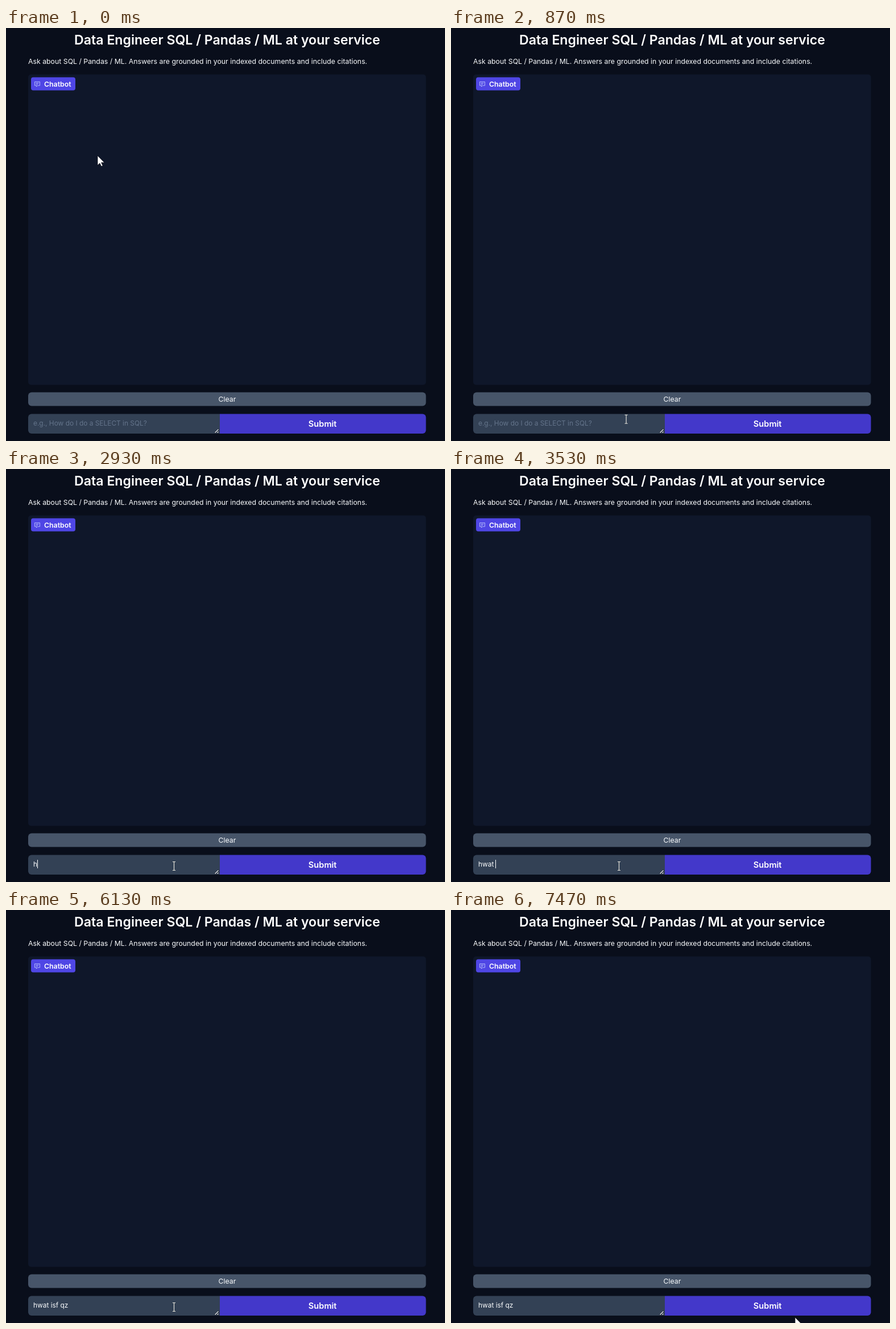
An HTML page that plays this animation: 772 px wide and 725 px high, repeating every 8 s.

```html
<!DOCTYPE html>
<html lang="en">
<head>
<meta charset="utf-8">
<title>Chatbot demo</title>
<style>
  html, body { margin: 0; width: 100%; height: 100%; overflow: hidden; background: #090e1b; }
  svg { display: block; width: 772px; height: 725px; }
  text { font-family: Inter, "Open Sans", sans-serif; font-size: 12.3px; fill: #f8fafc; white-space: pre; }
  .middle { text-anchor: middle; }
  .strong { font-weight: 600; fill: #fff; }
  .title { font-size: 23.1px; }
  .submit { font-size: 14.6px; }
  .field { font-size: 11.9px; }
  .hint { fill: #64748b; }
</style>
</head>
<body>
<svg viewBox="0 0 772 725">
  <rect width="772" height="725" fill="#090e1b"/>
  <text class="middle strong title" x="389" y="28.5">Data Engineer SQL / Pandas / ML at your service</text>
  <text x="39" y="63">Ask about SQL / Pandas / ML. Answers are grounded in your indexed documents and include citations.</text>

  <rect x="39" y="81.5" width="699.5" height="545" rx="5" fill="#0f172a"/>
  <rect x="44" y="86.5" width="78" height="23" rx="4" fill="#4f46e5"/>
  <path d="M50.5 94.5h9v6.5h-4l-2 2v-2h-3zM52.5 96.8h5M52.5 98.8h3.5" fill="none" stroke="#c7d2fe" stroke-width=".8"/>
  <text class="strong" x="67" y="102.5">Chatbot</text>

  <rect x="39" y="639.5" width="699.5" height="24" rx="6" fill="#475569"/>
  <text class="middle" x="389" y="656">Clear</text>

  <path d="M376 677.5H45a6 6 0 0 0-6 6v22.5a6 6 0 0 0 6 6h331z" fill="#334155"/>
  <path d="M376 677.5h356.5a6 6 0 0 1 6 6v22.5a6 6 0 0 1-6 6H376z" fill="#4338ca"/>
  <text class="middle strong submit" x="556.7" y="699.5">Submit</text>
  <g fill="none" transform="translate(-.5 -.5)">
    <path d="M367.5 711.5l7-7M371.5 711.5l3-3" stroke="#0f172a" stroke-width="2.2"/>
    <path d="M368 711l6-6M372 711l2-2" stroke="#fff" stroke-width="1.2"/>
  </g>
  <text id="hint" class="field hint" x="48" y="697.5">e.g., How do I do a SELECT in SQL?</text>
  <text id="typed" class="field" x="48" y="697.5"></text>
  <rect id="caret" y="686" width="1" height="15" fill="#fff"/>

  <path id="arrow" d="M0 0V17L4 13.4L6.6 19L9.2 17.8L6.6 12.2H12Z" fill="#fff" stroke="#0b0f19" stroke-width=".8"/>
  <path id="beam" d="M-2.5-7.5H-.7L0-7L.7-7.5H2.5M0-7V7M-2.5 7.5H-.7L0 7L.7 7.5H2.5" fill="none" stroke="#f1eee4" stroke-width="1.1"/>
</svg>
<script>
const LOOP = 8000, FRAME = 1000 / 15, BLINK = 510, CLICK = 1200;
const [hint, typed, caret, arrow, beam] =
  ["hint", "typed", "caret", "arrow", "beam"].map(id => document.getElementById(id));

const bursts = [
  { text: "hwat ", start: 2930, gap: 150 },
  { text: "is", start: 4270, gap: 0 },
  { text: "f q", start: 4670, gap: 130 },
  { text: "z ", start: 5400, gap: 200 }
];
const keys = bursts.flatMap(({ text, start, gap }) =>
  [...text].map((char, i) => ({ char, time: start + i * gap })));

const home = [161, 224], rest = [295.5, 697], panel = [414, 439], below = [605, 715];
const progress = (time, start, end) => Math.min(1, Math.max(0, (time - start) / (end - start)));
// Quick departure with a long, soft landing.
const swoop = u => u ** 2 / (u ** 2 + (1 - u) ** 6.5);
const bezier = (a, b, c, d, s) => a.map((_, i) =>
  (1 - s) ** 3 * a[i] + 3 * s * (1 - s) ** 2 * b[i] + 3 * s * s * (1 - s) * c[i] + s ** 3 * d[i]);

function pointerAt(time) {
  if (time < 6870) return bezier(home, [90, 140], [600, 460], rest, swoop(progress(time, 270, 1330)));
  if (time < 7190) {
    const s = progress(time, 6870, 7130);
    return rest.map((from, i) => from + (panel[i] - from) * s);
  }
  return time < 7460 ? null : below;
}

function caretVisible(time, pressed) {
  if (time < CLICK) return false;
  const last = pressed.length ? pressed.at(-1).time : CLICK;
  return Math.floor((time - last) / BLINK) % 2 === 0;
}

const show = (node, visible) => node.setAttribute("visibility", visible ? "visible" : "hidden");

function render(now) {
  const time = Math.floor((now + 5) / FRAME) * FRAME;
  const pressed = keys.filter(key => key.time <= time);
  const text = pressed.map(key => key.char).join("");
  if (typed.textContent !== text) typed.textContent = text;
  show(hint, !text);

  const width = text ? typed.getComputedTextLength() : 0;
  caret.setAttribute("x", Math.floor(48 + width));
  show(caret, caretVisible(time, pressed));

  const spot = pointerAt(time);
  const inField = spot && spot[0] < 376 && spot[1] > 678 && spot[1] < 712;
  show(beam, inField);
  show(arrow, spot && !inField);
  if (spot) (inField ? beam : arrow).setAttribute("transform", `translate(${spot})`);
}

const began = performance.now();
function tick() {
  render((performance.now() - began) % LOOP);
  requestAnimationFrame(tick);
}
tick();
</script>
</body>
</html>
```
